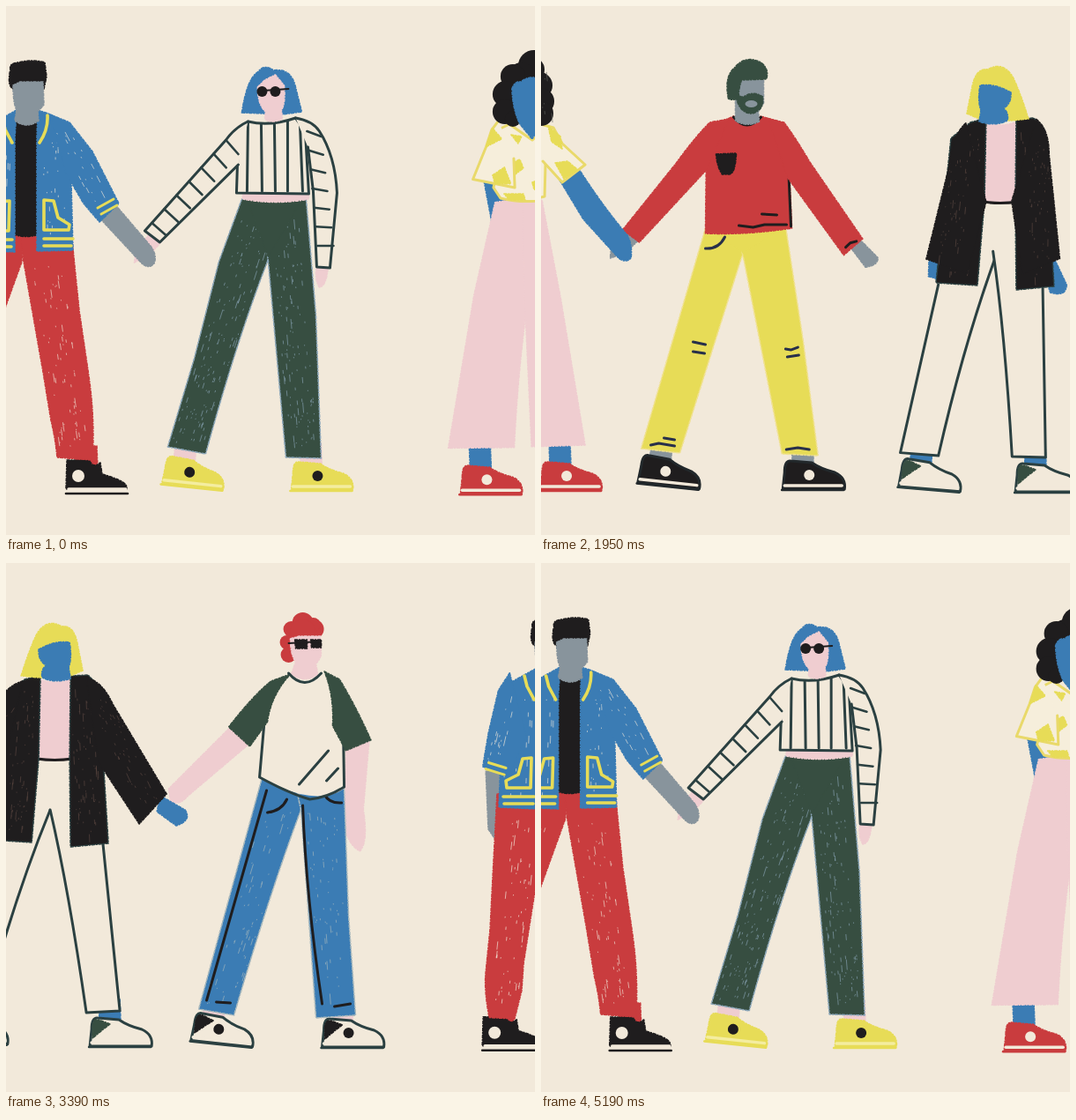
An HTML page for the animation above (5.22 s loop, 600 by 600 pixels).

```html
<!DOCTYPE html>
<html lang="en">
<head>
<meta charset="utf-8">
<title>Hand in hand</title>
<style>
html, body { margin: 0; width: 100%; height: 100%; overflow: hidden; background: #f2e9da; }
svg { display: block; width: 100vw; height: 100vh; }
path { stroke-linecap: round; stroke-linejoin: round; }
</style>
</head>
<body>
<svg id="stage" viewBox="0 0 600 600"></svg>
<script>
const LOOP = 5220, SLOT = LOOP / 6, SPEED = 0.3235, STEP = 30;
const CREAM = '#f2e9da', BLUE = '#3b7cb4', RED = '#c93c3e', YELLOW = '#e7dc57', GREEN = '#374e41',
  BLACK = '#1f1d1e', PINK = '#efcdd0', GREY = '#88949c', INK = '#2b4041', NAVY = '#28304a';

let seed = 7;
const random = () => (seed = seed * 16807 % 2147483647) / 2147483647;

// Crayon fill: solid shape with a slightly broken edge.
const fill = (color, d, edge = color) =>
  `<path fill="${color}" stroke="${edge}" stroke-width="1.6" stroke-dasharray="3 2 1 2" d="${d}"/>`;
const line = (color, d, width = 3) =>
  `<path fill="none" stroke="${color}" stroke-width="${width}" d="${d}"/>`;
const outlined = (color, edge, d) =>
  `<path fill="${color}" stroke="${edge}" stroke-width="3" d="${d}"/>`;
const dot = (color, x, y, r) => `<circle cx="${x}" cy="${y}" r="${r}" fill="${color}"/>`;
const blobs = (color, list) => list.map(b => dot(color, ...b)).join('');

// Stripes between two edges running side by side.
function rungs([ax, ay, bx, by], [cx, cy, dx, dy], count) {
  let d = '';
  for (let i = 0; i < count; i++) {
    const k = i / (count - 1), mix = (a, b) => (a + (b - a) * k).toFixed(1);
    d += `M${mix(ax, bx)} ${mix(ay, by)}L${mix(cx, dx)} ${mix(cy, dy)}`;
  }
  return line(INK, d, 2.6);
}

// Small gaps in the crayon, scattered along a limb.
function flecks(color, ax, ay, bx, by, spread, count) {
  const len = Math.hypot(bx - ax, by - ay);
  let d = '';
  for (let i = 0; i < count; i++) {
    const k = random(), size = 0.5 + random() ** 4 * 11;
    const x = ax + (bx - ax) * k + (random() - 0.5) * spread, y = ay + (by - ay) * k;
    d += `M${x.toFixed(1)} ${y.toFixed(1)}l${((bx - ax) / len * size).toFixed(1)} ${((by - ay) / len * size).toFixed(1)}`;
  }
  return `<path fill="none" stroke="${color}" stroke-width=".9" opacity=".7" d="${d}"/>`;
}

function shoe(x, y, s) {
  const upper = s.high
    ? 'M1 -38L27 -38Q30 -28 39 -35L41 -22Q50 -20 63 -14Q70 -10 69 -5L0 -5Z'
    : 'M3 -20Q3 -34 10 -33L34 -31Q44 -24 60 -20Q73 -14 71 -1L1 -1Z';
  const trim = s.line || s.color;
  return `<g transform="translate(${x} ${y})">` +
    fill(s.skin, 'M11 -54H35L36 -28H12Z') + fill(s.color, upper) +
    (s.line ? line(trim, upper, 3) : '') +
    (s.heel ? fill(s.heel, 'M4 -22Q4 -32 11 -31L24 -26L16 -20L4 -10Z') : '') +
    line(s.sole, 'M3 -5H68', 3.5) + line(trim, 'M0 0H70', 2.6) +
    (s.mark ? dot(s.mark, s.high ? 14 : 31, s.high ? -20 : -17, s.high ? 7 : 6) : '') + '</g>';
}

// Limb: pivot, angle at rest, angle when stretched out, drawing, and the hand or foot at its end.
const limb = (px, py, rest, out, art, tip) => ({ px, py, rest, out, art, tip });
const foot = (x, y, style) => ({ x: x + 22, y: y - 38, art: shoe(x, y, style) });
const hand = (x, y, bend, color, d) => ({ x, y, bend, art: fill(color, d) });

function jacket() {
  const shoes = { color: BLACK, sole: CREAM, mark: CREAM, skin: RED, high: true };
  return {
    legL: limb(-2, 270, -11, 0, fill(RED, 'M-33 256L20 256L18 290L-40 450L-48 480L-62 510L-90 503Q-90 475 -85 455L-70 405Z') +
      flecks(CREAM, -8, 290, -72, 495, 32, 60), foot(-98, 543, shoes)),
    legR: limb(46, 270, 4.8, 0, fill(RED, 'M16 256L74 256L83 345L94 420Q101 470 98 515L58 512Q56 490 51 470L42 415L20 290Z') +
      flecks(CREAM, 46, 290, 76, 500, 34, 70), foot(68, 553, shoes)),
    body: fill(BLACK, 'M10 130Q22 140 36 130L38 259Q22 264 9 259Z') +
      fill(BLUE, 'M12 118L-6 128L-28 140L-33 277L10 279L10 150Z') +
      fill(BLUE, 'M36 118L48 122L72 134L74 200L76 277L35 278L35 150Z') +
      flecks(CREAM, -8, 150, -12, 265, 36, 24) + flecks(CREAM, 54, 140, 56, 265, 30, 24) +
      line(YELLOW, 'M-4 128L-1 140L7 155M47 124Q48 140 38 155M-6 222L4 221L3 255L-24 255L-25 247L-11 240ZM43 220L54 221L59 240L72 248L71 254L43 254ZM-28 265H7M-27 273H6M43 264H76M43 272H74', 3.6),
    armL: limb(-20, 140, -26, 0, fill(BLUE, 'M-14 126L-34 138L-65 176L-88 208L-66 231L-28 198Z') +
      flecks(CREAM, -26, 150, -70, 205, 22, 20) + line(YELLOW, 'M-80 207L-65 221M-86 212L-70 227'),
      hand(-77, 218, -14, GREY, 'M-86 212L-66 227L-98 262L-118 282L-128 284L-126 264Z')),
    armR: limb(60, 140, 17, 0, fill(BLUE, 'M50 123L72 132L98 165L128 224L106 245L88 224L68 190Z') +
      flecks(CREAM, 66, 140, 110, 225, 22, 20) + line(YELLOW, 'M104 229L122 219M108 236L126 226'),
      hand(115, 234, 24, GREY, 'M102 236L122 223L163 271Q172 282 168 292Q162 299 154 292L130 266Z')),
    head: fill(BLACK, 'M5 72Q3 65 14 64Q30 60 44 64L46 80L43 94H8Q1 90 5 72Z') +
      fill(GREY, 'M8 90L16 86H42L43 112L36 120L37 130Q24 140 10 130L12 118Q8 110 8 90Z')
  };
}

function stripes() {
  const shoes = { color: YELLOW, sole: '#f4eda0', mark: BLACK, skin: PINK };
  const dust = '#8ba6b8';
  return {
    cx: 19, turn: -820,
    legL: limb(10, 235, -11, 0, fill(GREEN, 'M-14 219L34 219L15 290Q-20 380 -55 508L-98 500L-68 400L-40 290Z', dust) +
      flecks(dust, 6, 240, -74, 495, 38, 150), foot(-102, 545, shoes)),
    legR: limb(38, 235, 0, -4.8, fill(GREEN, 'M8 219L59 219L70 350L76 513L36 512L16 290Z', dust) +
      flecks(dust, 34, 240, 56, 500, 32, 120), foot(41, 550, shoes)),
    body: fill(GREEN, 'M-8 220H54L16 284Z') + fill(PINK, 'M-13 210H62V219Q24 226 -13 219Z') +
      outlined(CREAM, INK, 'M-7 131Q18 137 47 127L58 142L62 213L-20 212L-18 150Z') +
      line(INK, 'M-7 133L-8 210M8 134L9 210M23 134L24 210M38 131V210M52 134L55 210'),
    armL: limb(-8, 145, -30, 0, outlined(CREAM, INK, 'M-7 131Q-22 138 -32 152L-124 255L-107 268L-18 180') +
      rungs([-32, 152, -116, 246], [-18, 168, -100, 260], 7),
      hand(-115, 262, -8, PINK, 'M-120 260L-104 266L-118 282L-136 291L-134 278Z')),
    armR: limb(60, 140, 0, -28.5, outlined(CREAM, INK, 'M47 127Q66 130 74 142Q92 170 94 212L86 297L71 296L67 210L61 160') +
      rungs([76, 148, 90, 272], [60, 142, 72, 272], 7),
      hand(78, 296, 0, PINK, 'M71 294L84 295Q82 318 74 319Q68 310 71 294Z')),
    head: fill(BLUE, 'M-14 121Q-8 82 4 75Q12 65 22 73Q42 70 47 92L54 120L32 123L10 122Z') +
      fill(PINK, 'M4 92L12 84L24 78L34 90Q36 110 31 118L32 128Q20 134 12 128L13 120Q4 112 4 92Z') +
      dot(BLACK, 9, 97, 6) + dot(BLACK, 24, 97, 6) + line(BLACK, 'M10 96L39 94', 2)
  };
}

function curls() {
  const shoes = { color: RED, sole: CREAM, mark: CREAM, skin: BLUE };
  const blouse = d => outlined('#f6eedb', '#e9d96a', d);
  return {
    legL: limb(10, 235, -9, 0, fill(PINK, 'M-6 220L38 220L27 290Q-8 400 -28 498L-102 487L-46 320Z'), foot(-92, 545, shoes)),
    legR: limb(48, 235, 4.5, 0, fill(PINK, 'M22 220L69 220L90 330L118 498L54 500L27 285Z'), foot(66, 550, shoes)),
    body: blouse('M8 134L34 152L58 132L74 142L72 216Q30 226 -2 218L-10 206L-4 180L-8 142Z') +
      fill(YELLOW, 'M2 182L20 174L24 184L8 196ZM42 163L64 156L66 166L44 174ZM34 200L50 194L46 210L36 208ZM2 213L24 213L26 220L8 220ZM10 146L22 148L18 156Z'),
    armL: limb(-6, 140, -27, 0, blouse('M0 132L-12 138L-26 152L-56 178L-18 208L-4 178') +
      fill(YELLOW, 'M-26 152L-10 136L-6 152ZM-34 184L-18 182L-20 202L-36 194Z'),
      hand(-34, 190, -26, BLUE, 'M-40 178L-16 198L-106 279Q-116 280 -122 268Z')),
    armR: limb(68, 140, 22, 0, blouse('M60 132L82 138L92 156L118 180L92 200L70 176') +
      fill(YELLOW, 'M76 136L90 148L92 162L80 154ZM84 178L98 176L110 186L94 196Z'),
      hand(102, 190, 22, BLUE, 'M87 194L109 182Q140 230 166 260Q172 272 170 286Q164 292 156 286L116 242Z')),
    head: blobs(BLACK, [[36, 68, 18], [22, 80, 16], [12, 80, 14], [4, 100, 15], [3, 120, 14], [12, 128, 9], [58, 72, 14],
      [66, 90, 15], [68, 108, 15], [68, 122, 14], [56, 124, 12], [54, 102, 14]]) +
      flecks('#60635f', 62, 64, 68, 130, 28, 20) +
      fill(BLUE, 'M11 94Q14 85 21 86Q34 76 46 86Q54 96 47 112L46 130L34 151L20 134Q12 118 11 94Z')
  };
}

function sweater() {
  const shoes = { color: BLACK, line: '#22282b', sole: CREAM, mark: CREAM, skin: GREY };
  const seam = '#f0e191';
  return {
    cx: 20, turn: -1000,
    legL: limb(2, 262, -11, 0, fill(YELLOW, 'M-27 252L30 252L14 285L-56 507L-100 502Z', seam) +
      line(NAVY, 'M-41 381L-27 384M-41 392L-28 394M-89 498L-80 496L-62 499M-74 490L-62 492'), foot(-101, 544, shoes)),
    legR: limb(38, 262, 4.6, 0, fill(YELLOW, 'M8 252L64 250L84 380L101 510L60 508L17 290Z', seam) +
      line(NAVY, 'M64 389L70 390L78 387M66 398L79 396M65 503L78 501L91 503'), foot(60, 549, shoes)),
    body: fill(YELLOW, 'M-22 254H58L16 280Z') + line(NAVY, 'M-27 275Q-12 276 -5 262') +
      fill(RED, 'M5 125Q20 140 36 125L62 133L68 180L71 252Q20 260 -27 258L-26 160L-20 136Z') +
      line(BLACK, 'M5 126Q20 144 36 126M67 180L70 250M11 249L27 251L40 248L65 248M37 236L54 237') +
      fill(BLACK, 'M-15 168L8 167Q7 190 0 191L-8 191Q-14 182 -15 168Z'),
    armL: limb(-14, 140, -29, 0, fill(RED, 'M0 128L-22 132Q-40 150 -60 178L-121 254L-102 268L-26 186Z'),
      hand(-111, 260, -8, GREY, 'M-118 252L-101 264L-118 280L-135 286L-134 274Z')),
    armR: limb(60, 140, 26, 0, fill(RED, 'M44 128L62 132Q76 150 92 176L154 262L133 281L67 194Z') +
      line(BLACK, 'M135 272L140 267L147 265'),
      hand(144, 270, 8, GREY, 'M150 262L172 283Q172 292 158 294L142 274Z')),
    head: fill(GREY, 'M7 84H39L39 110L33 120L34 131Q20 138 7 130Z') +
      fill(GREEN, 'M-1 105Q-6 80 6 70Q18 55 36 64Q46 72 42 83L14 84Q10 95 11 104Q4 108 -1 105Z') +
      fill(GREEN, 'M8 96Q12 106 18 102Q28 96 38 103Q40 118 26 122Q12 122 8 104Z') +
      `<ellipse cx="25" cy="111" rx="7" ry="4" fill="${GREY}"/>`
  };
}

function coat() {
  const shoes = { color: CREAM, line: INK, sole: CREAM, heel: GREEN, skin: BLUE };
  const wear = '#5d4942';
  const flat = d => `<path fill="${CREAM}" d="${d}"/>`;
  return {
    cx: 23, turn: -1050,
    legL: limb(8, 240, -11, 0, flat('M-14 222H30L21 280L-54 508L-97 503L-47 314Z') +
      line(INK, 'M21 280Q-20 380 -54 508L-97 503L-47 314'), foot(-97, 545, shoes)),
    legR: limb(40, 240, 4.8, 0, flat('M14 222H60L80 320L100 508L62 510L21 280Z') +
      line(INK, 'M21 280Q42 370 62 510L100 508L80 310'), foot(65, 549, shoes)),
    body: fill(PINK, 'M8 132Q26 138 43 132L44 222L9 222Z') + line(BLACK, 'M6 222Q26 225 46 222') +
      fill(BLACK, 'M10 127L-8 132L-30 150L-47 314L0 317L8 222Z', INK) +
      fill(BLACK, 'M44 128L64 127L76 140L87 318L44 322L43 222Z', INK) +
      flecks(wear, -8, 145, -22, 305, 28, 70) + flecks(wear, 58, 140, 66, 310, 28, 70),
    armL: limb(-14, 140, -27, 0, fill(BLACK, 'M-10 134Q-28 138 -50 170L-120 251L-86 287L-30 224Z') +
      flecks(wear, -30, 160, -94, 260, 30, 50),
      hand(-106, 266, -10, BLUE, 'M-114 250L-100 264Q-110 280 -118 278L-127 266Z')),
    armR: limb(68, 140, 25, 0, fill(BLACK, 'M62 130Q80 134 92 160L153 262L122 296L76 226Z') +
      flecks(wear, 78, 155, 130, 270, 26, 50),
      hand(142, 274, 10, BLUE, 'M146 264L174 280Q182 292 164 298L142 282Z')),
    head: fill(YELLOW, 'M-12 128Q-2 96 6 80Q18 62 34 72Q48 70 52 92L58 122L44 128L8 130Z') +
      fill(BLUE, 'M8 98L16 94Q30 88 43 90Q46 108 42 118L44 131Q26 137 12 130Q10 122 16 116Q7 110 8 98Z')
  };
}

function ginger() {
  const shoes = { color: CREAM, line: INK, sole: CREAM, heel: BLACK, mark: BLACK, skin: PINK };
  const fade = '#a9b9bd';
  return {
    cx: 28, turn: -1100,
    legL: limb(6, 262, -11, 0, fill(BLUE, 'M-20 243L30 262L24 280Q-10 370 -52 513L-92 506Z', fade) + flecks(fade, 0, 275, -68, 500, 36, 60) +
      line(BLACK, 'M-15 258Q-50 380 -83 496M-14 283Q2 281 8 268M-72 498L-56 499'), foot(-98, 545, shoes)),
    legR: limb(46, 262, 0, -5, fill(BLUE, 'M20 262L73 256L78 400L86 513L41 516L24 280Z', fade) + flecks(fade, 46, 275, 64, 505, 34, 60) +
      line(BLACK, 'M26 275Q30 380 48 500M50 262Q56 273 70 272M62 503L80 500'), foot(47, 550, shoes)),
    body: `<path fill="${CREAM}" d="M10 126Q28 142 47 126L70 134L73 256Q40 278 -23 243L-20 175L-8 136Z"/>` +
      line(INK, 'M-18 185L-23 243Q12 262 34 268Q54 266 73 254L72 190M55 213L22 251M66 233L53 247'),
    armL: limb(-4, 140, -20, 0, fill(GREEN, 'M12 126L-10 134Q-30 150 -58 186L-34 208L-14 180Q-10 150 12 126Z'),
      hand(-45, 196, -32, PINK, 'M-52 182L-31 202L-104 264Q-114 276 -124 270L-126 256Z')),
    armR: limb(62, 140, 13, 0, fill(GREEN, 'M47 126L66 131Q92 158 116 190L91 208L70 184Q64 150 47 126Z'),
      hand(103, 198, 22, PINK, 'M88 200L110 186L150 255Q176 282 174 296Q162 298 146 286Z')),
    head: blobs(RED, [[26, 68, 12], [39, 75, 11], [38, 70, 8], [13, 75, 9], [8, 90, 8], [10, 104, 9], [26, 78, 14]]) +
      fill(PINK, 'M12 86L22 83H46L47 104Q44 112 41 114L43 126Q28 137 13 126L18 112Q12 104 12 86Z') +
      line(INK, 'M10 125Q28 146 47 125') + fill(BLACK, 'M17 87H31V97H18ZM35 87H47V96H36Z') + line(BLACK, 'M10 91L46 89', 2)
  };
}

const LIMBS = ['legL', 'legR', 'armL', 'armR'];
const stage = document.getElementById('stage');
const people = [jacket, stripes, curls, sweater, coat, ginger].map((make, slot) => {
  const person = make();
  const group = document.createElementNS('http://www.w3.org/2000/svg', 'g');
  const part = (name, art) => `<g data-part="${name}">${art}</g>`;
  const tip = name => part(name + 'Tip', person[name].tip.art);
  const leg = name => part(name, tip(name) + person[name].art);
  group.innerHTML = tip('armL') + tip('armR') + leg('legL') + leg('legR') + person.body +
    part('armL', person.armL.art) + part('armR', person.armR.art) + part('head', person.head);
  const parts = {};
  group.querySelectorAll('[data-part]').forEach(el => parts[el.dataset.part] = el);
  return { ...person, slot, group, parts };
});

function ease(time, from, to) {
  const k = Math.min(1, Math.max(0, (time - from) / (to - from)));
  return k * k * (3 - 2 * k);
}

function pose(person, time) {
  const { parts } = person;
  const reach = {
    legL: ease(time, -1660, -1480), armL: ease(time, -1530, -1330),
    legR: ease(time, -800, -650), armR: ease(time, -790, -640)
  };
  person.group.setAttribute('transform', `translate(${(-SPEED * time).toFixed(2)} 0)`);
  for (const name of LIMBS) {
    const { px, py, rest, out, tip } = person[name];
    const angle = rest + (out - rest) * reach[name];
    const turn = `rotate(${angle} ${px} ${py})`;
    parts[name].setAttribute('transform', turn);
    if (name.startsWith('arm')) {
      const bend = tip.bend * (1 - reach[name]);
      parts[name + 'Tip'].setAttribute('transform', `${turn} rotate(${bend} ${tip.x} ${tip.y})`);
    } else {
      // Feet stay level, except for the heel-down tilt of the leading one.
      const tilt = name === 'legL' ? reach.legL * (6 - 4 * ease(time, -650, -560)) : 0;
      parts[name + 'Tip'].setAttribute('transform', `rotate(${tilt - angle} ${tip.x} ${tip.y})`);
    }
  }
  if (person.turn) {
    const drawnLeft = person.slot === 1;
    const flip = (time < person.turn) !== drawnLeft;
    parts.head.setAttribute('transform', flip ? `translate(${2 * person.cx} 0) scale(-1 1)` : '');
  }
}

let front = null;
function render(now) {
  const t = Math.floor(now % LOOP / STEP) * STEP;
  for (const person of people) {
    person.time = (t - person.slot * SLOT + 2500 + LOOP) % LOOP - 2500;
    pose(person, person.time);
  }
  // People on the left overlap the hands of those on the right.
  const order = [...people].sort((a, b) => a.time - b.time);
  if (order[5] !== front) {
    front = order[5];
    stage.append(...order.map(p => p.group));
  }
}

const start = performance.now();
function tick() {
  render(performance.now() - start);
  requestAnimationFrame(tick);
}
tick();
</script>
</body>
</html>
```
